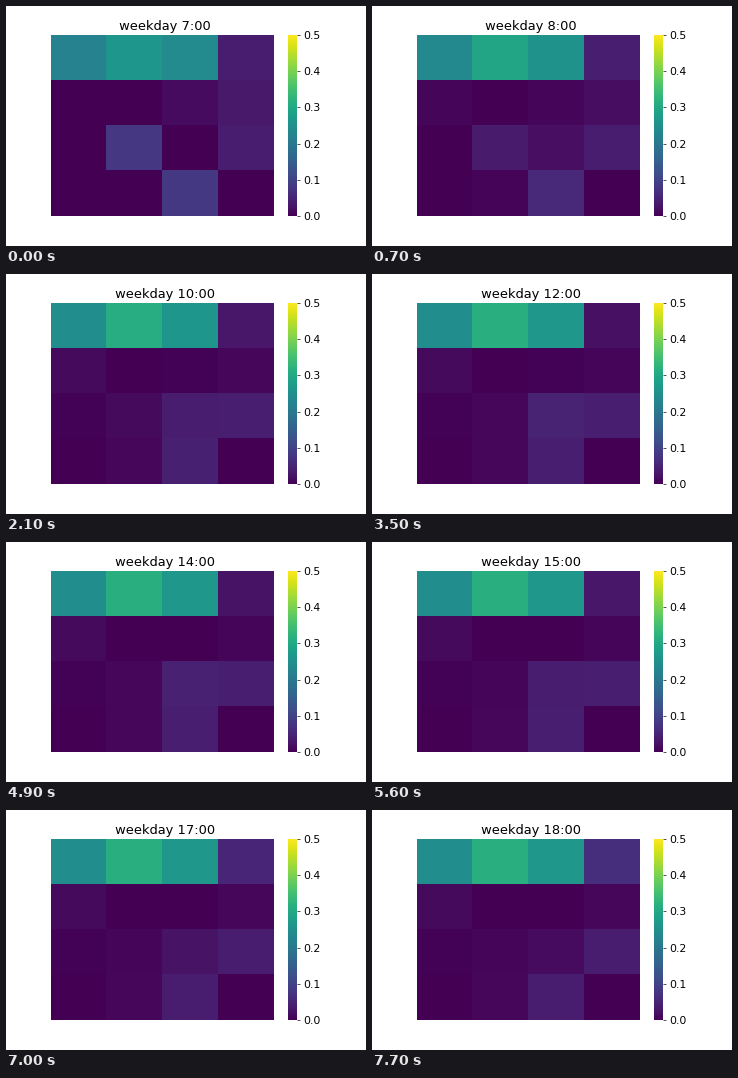
Recreate the animation shown at these times as a matplotlib script. Size 360 by 240 pixels, loop 8000 ms.

```python
import numpy as np
import matplotlib.pyplot as plt
from matplotlib.animation import FuncAnimation

W, H, DPI = 360, 240, 60
INTERVAL, FRAMES = 100, 80
STEPS_PER_HOUR = 7
FIRST_HOUR, LAST_HOUR = 7, 18
LEFT, TOP, WIDTH, HEIGHT = 45, 28.8, 223.2, 181.2

plt.rcParams.update({"font.family": "DejaVu Sans", "font.size": 13})

# Occupancy in percent when the day starts and once it has settled.
EARLY = np.array([[22, 26.2, 23.8, 4],
                  [0, 0, 1.5, 3.2],
                  [0, 8, 0, 4],
                  [0, 0, 8.2, 0]])
SETTLED = np.array([[24.6, 31.5, 26.7, 6.5],
                    [1.3, 0, 0, 0.9],
                    [0.3, 0.6, 1.5, 4],
                    [0, 0.9, 4, 0]])


def spot(row, col, size=0.6):
    r, c = np.indices(EARLY.shape)
    return np.exp(-((r - row) ** 2 + (c - col) ** 2) / size ** 2)


def grid_at(hour):
    fade = 0.4 ** (hour - FIRST_HOUR)
    midday = np.sin(np.pi * (hour - FIRST_HOUR) / (LAST_HOUR - FIRST_HOUR))
    drift = 3.3 * spot(2, 2) - 4.5 * spot(0, 3)
    grid = SETTLED + (EARLY - SETTLED) * fade + drift * midday
    return np.clip(grid, 0, None) / 100


def add_axes(left, width):
    return fig.add_axes([left / W, 1 - (TOP + HEIGHT) / H, width / W, HEIGHT / H])


fig = plt.figure(figsize=(W / DPI, H / DPI), dpi=DPI, facecolor="white")

# Cell edges are given in whole pixels of the stage.
ax = add_axes(LEFT, WIDTH)
ax.axis("off")
x_edges = np.floor(np.linspace(LEFT, LEFT + WIDTH, 5))
y_edges = np.floor(np.linspace(29, 210, 5))
mesh = ax.pcolormesh(x_edges, y_edges, grid_at(FIRST_HOUR),
                     cmap="viridis", vmin=0, vmax=0.5)
ax.set_xlim(LEFT, LEFT + WIDTH)
ax.set_ylim(TOP + HEIGHT, TOP)
title = ax.set_title("")

cax = add_axes(LEFT + 1.25 * WIDTH * 0.85, HEIGHT / 20)
bar = fig.colorbar(mesh, cax=cax, ticks=np.arange(6) / 10)
bar.outline.set_visible(False)


def update(i):
    hour = min(FIRST_HOUR + i // STEPS_PER_HOUR, LAST_HOUR)
    mesh.set_array(grid_at(hour))
    title.set_text(f" weekday {hour}:00")
    return mesh, title


anim = FuncAnimation(fig, update, frames=FRAMES, interval=INTERVAL,
                     repeat=True, repeat_delay=0, blit=False)
plt.show()
```
